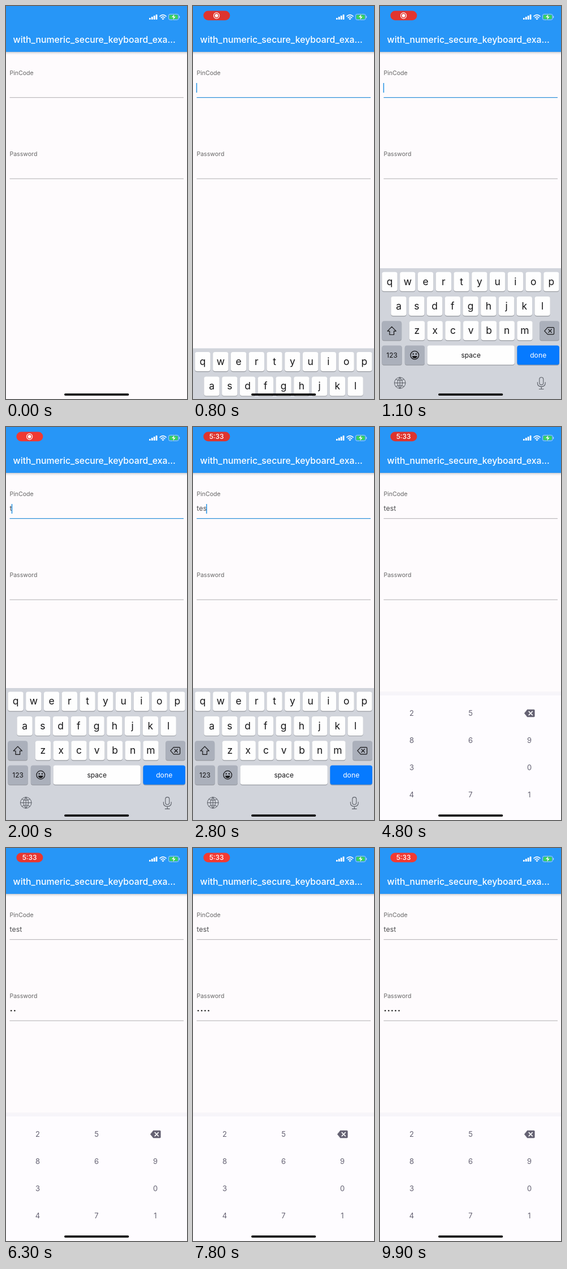
Animation of 320 by 694 pixels, one loop 10000 ms. Source, as an HTML page:

```html
<!DOCTYPE html>
<html lang="en">
<head>
<meta charset="utf-8">
<title>Secure keyboard demo</title>
<style>
  html, body { margin: 0; width: 100%; height: 100%; overflow: hidden; background: #fefbfd; }
  svg { display: block; width: 100vw; height: 100vh; }
  text { font-family: Inter, Roboto, sans-serif; white-space: pre; }
</style>
</head>
<body>
<svg id="stage" viewBox="0 0 320 694" xmlns="http://www.w3.org/2000/svg">
  <defs>
    <linearGradient id="barShade" x1="0" y1="0" x2="0" y2="1">
      <stop offset="0" stop-color="#304050" stop-opacity=".42"/>
      <stop offset=".4" stop-color="#304050" stop-opacity=".14"/>
      <stop offset="1" stop-color="#304050" stop-opacity="0"/>
    </linearGradient>
    <linearGradient id="padShade" x1="0" y1="0" x2="0" y2="1">
      <stop offset="0" stop-color="#f8f5f9"/>
      <stop offset="1" stop-color="#f6f5fa"/>
    </linearGradient>
  </defs>
</svg>
<script>
const LOOP = 10000, STEP = 100;
const KEYBOARD = { top: 461, height: 233, up: 715, down: 3355, span: 500 };
const PAD = { top: 467, height: 227, up: 3700, span: 300 };
const FOCUS = { from: 700, to: 3450 };
const TYPED = [1900, 2250, 2550, 2850];
const DOTS = [5200, 5900, 6600, 7300, 8400];

const stage = document.getElementById('stage');

function add(parent, tag, attrs, content) {
  const node = document.createElementNS('http://www.w3.org/2000/svg', tag);
  for (const name in attrs) node.setAttribute(name, attrs[name]);
  if (content !== undefined) node.textContent = content;
  parent.appendChild(node);
  return node;
}
const group = (parent = stage) => add(parent, 'g', {});
const rect = (parent, x, y, width, height, fill, rx = 0) =>
  add(parent, 'rect', { x, y, width, height, fill, rx });
const dot = (parent, cx, cy, r, fill) => add(parent, 'circle', { cx, cy, r, fill });
const line = (parent, d, stroke, width = 1.2) => add(parent, 'path', {
  d, stroke, fill: 'none', 'stroke-width': width,
  'stroke-linecap': 'round', 'stroke-linejoin': 'round'
});
const label = (parent, str, x, y, size, fill, weight = 400, anchor = 'start') =>
  add(parent, 'text', {
    x, y, fill, 'font-size': size, 'font-weight': weight, 'text-anchor': anchor
  }, str);
const show = (node, on) => node.setAttribute('visibility', on ? 'visible' : 'hidden');
const shift = (node, y) => node.setAttribute('transform', `translate(0 ${y})`);

// Form
rect(stage, 0, 0, 320, 694, '#fefbfd');
label(stage, 'PinCode', 6.4, 122, 10.6, '#666');
label(stage, 'Password', 6.4, 265, 10.6, '#666');
const pinLine = rect(stage, 6.5, 161, 307.5, 1.2, '#bdbbbd');
rect(stage, 6.5, 304.4, 307.5, 1.2, '#bdbbbd');
const pinText = label(stage, '', 6.6, 148, 12.3, '#4c4c4e');
const caret = rect(stage, 5.7, 136, 1.5, 17, '#2492e4');
const dots = DOTS.map((_, i) => dot(stage, 9.2 + i * 6.1, 287.3, 1.25, '#222'));

// App bar
rect(stage, 0, 80, 320, 6, 'url(#barShade)');
rect(stage, 0, 0, 320, 81, '#2796f7');
label(stage, 'with_numeric_secure_keyboard_exa...', 12.6, 65, 15.8, '#fff', 500);

// Status icons
[3, 5, 7, 9].forEach((h, i) => rect(stage, 253 + i * 3.9, 24 - h, 2.8, h, '#fff', .7));
line(stage, 'M272 18.2Q277.5 13.2 283 18.2M274.2 20.6Q277.5 17.8 280.8 20.6', '#fff', 1.6);
add(stage, 'path', { d: 'M277.5 24.6L275.3 22.4Q277.5 20.8 279.7 22.4Z', fill: '#fff' });
add(stage, 'rect', {
  x: 287.4, y: 14.4, width: 17.8, height: 10, rx: 2.8,
  fill: 'none', stroke: '#b4d8f6', 'stroke-width': .9
});
rect(stage, 288.8, 15.8, 15, 7.2, '#39d35c', 1.6);
rect(stage, 306, 17.6, 1.2, 3.6, '#b4d8f6', .6);
add(stage, 'path', {
  d: 'M298.2 13.4L292.6 20H296L294.4 25.4L300.2 18.6H296.8Z',
  fill: '#fff', stroke: '#39b968', 'stroke-width': .5
});

// Recording pill
const pill = group();
const pillBack = rect(pill, 18.4, 8.6, 47, 16.6, '#f03a31', 8.3);
const record = group(pill);
add(record, 'circle', { cx: 41.6, cy: 17, r: 5.1, fill: 'none', stroke: '#fff', 'stroke-width': 1.1 });
dot(record, 41.6, 17, 3, '#fff');
const clock = label(pill, '5:33', 41.6, 21.3, 12, '#fff', 500, 'middle');

// Letter keyboard
const keyboard = group();
const INK = '#161618';
function key(x, y, w, fill, str, size = 17.5, ink = INK) {
  rect(keyboard, x, y + 1, w, 34.2, '#989ba1', 4);
  rect(keyboard, x, y, w, 34, fill, 4);
  if (str) label(keyboard, str, x + w / 2, y + (size > 15 ? 22.8 : 21.4), size, ink, 400, 'middle');
}
rect(keyboard, 0, KEYBOARD.top, 320, KEYBOARD.height + 2, '#d1d4db');
[['qwertyuiop', 3.4], ['asdfghjkl', 19.4], ['zxcvbnm', 51.8]].forEach(([row, left], r) =>
  [...row].forEach((c, i) => key(left + i * 31.76, 467.6 + r * 43.3, 27.3, '#fefefe', c)));
const GREY = '#abb0bb';
key(3.4, 554.2, 34.8, GREY);
key(282.2, 554.2, 34.8, GREY);
key(3.4, 597.5, 35.4, GREY, '123', 12);
key(43.8, 597.5, 35.2, GREY);
key(83.6, 597.5, 154.2, '#fefefe', 'space', 12);
key(242.4, 597.5, 74.6, '#067aff', 'done', 12.2, '#fff');
line(keyboard, 'M20.8 564.2L28.4 572H24.6V578.4H17V572H13.2Z', INK);
line(keyboard, 'M296.4 565.6H306Q307.6 565.6 307.6 567.2V576.2Q307.6 577.8 306 577.8H296.4L290.8 571.7Z'
  + 'M297.8 568.9L303.4 574.5M303.4 568.9L297.8 574.5', INK);
line(keyboard, 'M54 614.5a7.3 7.3 0 1 0 14.6 0a7.3 7.3 0 1 0 -14.6 0', INK, 1.3);
dot(keyboard, 58.7, 612.4, 1.2, INK);
dot(keyboard, 63.9, 612.4, 1.2, INK);
add(keyboard, 'path', { d: 'M56.8 615.8H65.8Q65 620 61.3 620Q57.6 620 56.8 615.8Z', fill: INK });
line(keyboard, 'M25.4 663.5a9.8 9.8 0 1 0 19.6 0a9.8 9.8 0 1 0 -19.6 0'
  + 'M35.2 653.7V673.3M25.4 663.5H45M35.2 653.7Q25.8 663.5 35.2 673.3Q44.6 663.5 35.2 653.7'
  + 'M28 657.2Q35.2 661.2 42.4 657.2M28 669.8Q35.2 665.8 42.4 669.8', '#5b5f67', 1);
add(keyboard, 'rect', {
  x: 281.8, y: 653.6, width: 7, height: 13.2, rx: 3.5,
  fill: 'none', stroke: '#5b5f67', 'stroke-width': 1.1
});
line(keyboard, 'M278.4 662.4V664Q278.4 670 285.3 670Q292.2 670 292.2 664V662.4M285.3 670V674.4M281.4 674.4H289.2',
  '#5b5f67', 1.1);

// Shuffled number pad
const pad = group();
const PAD_INK = '#656273';
rect(pad, 0, PAD.top, 320, PAD.height, '#fefcff');
rect(pad, 0, PAD.top, 320, 7, 'url(#padShade)');
['25', '869', '3 0', '471'].forEach((row, r) =>
  [...row].forEach((c, i) =>
    label(pad, c, 56 + i * 104, 510.2 + r * 48, 13, PAD_INK, 400, 'middle')));
add(pad, 'path', {
  d: 'M260.4 498.8H272Q273.6 498.8 273.6 500.4V510.6Q273.6 512.2 272 512.2H260.4L255 505.5Z',
  fill: PAD_INK
});
line(pad, 'M263.2 502.4L269.4 508.6M269.4 502.4L263.2 508.6', '#fff', 1.6);

rect(stage, 103, 684.2, 114.4, 3.8, '#080808', 1.9);

const clamp = v => Math.min(1, Math.max(0, v));
function bezier(x1, y1, x2, y2) {
  const at = (a, b, u) => 3 * (1 - u) ** 2 * u * a + 3 * (1 - u) * u * u * b + u ** 3;
  return x => {
    let lo = 0, hi = 1;
    for (let i = 0; i < 24; i++) {
      const mid = (lo + hi) / 2;
      if (at(x1, x2, mid) < x) lo = mid; else hi = mid;
    }
    return at(y1, y2, lo);
  };
}
const glide = bezier(.38, .7, .125, 1);
const settle = bezier(0, 0, .2, 1);
const progress = (t, from, span, ease) => ease(clamp((t - from) / span));

function render(t) {
  const raised = progress(t, KEYBOARD.up, KEYBOARD.span, glide)
    - progress(t, KEYBOARD.down, KEYBOARD.span, glide);
  shift(keyboard, (1 - raised) * KEYBOARD.height);
  show(keyboard, raised > .001);

  const opened = progress(t, PAD.up, PAD.span, settle);
  shift(pad, (1 - opened) * PAD.height);
  show(pad, opened > 0);

  const focused = t >= FOCUS.from && t < FOCUS.to;
  pinLine.setAttribute('fill', focused ? '#2c8fd8' : '#bdbbbd');
  const count = TYPED.filter(at => t >= at).length;
  pinText.textContent = 'test'.slice(0, count);
  const lastInput = count ? TYPED[count - 1] : FOCUS.from;
  show(caret, focused && (t - lastInput) % 1000 < 500);
  caret.setAttribute('x', 5.7 + (count ? pinText.getComputedTextLength() : 0));
  dots.forEach((d, i) => show(d, t >= DOTS[i]));

  pill.setAttribute('opacity', clamp((t - 200) / 300));
  const glow = (1 + Math.cos((t - 3800) / 1000 * Math.PI)) / 2;
  pillBack.setAttribute('fill', `rgb(${222 + 20 * glow}, ${52 + 6 * glow}, ${46 + 4 * glow})`);
  show(record, t < 2700);
  show(clock, t >= 2700);
}

const start = performance.now();
function tick() {
  const t = (performance.now() - start) % LOOP;
  render(Math.floor(t / STEP) * STEP);
  requestAnimationFrame(tick);
}
render(0);
requestAnimationFrame(tick);
</script>
</body>
</html>
```
